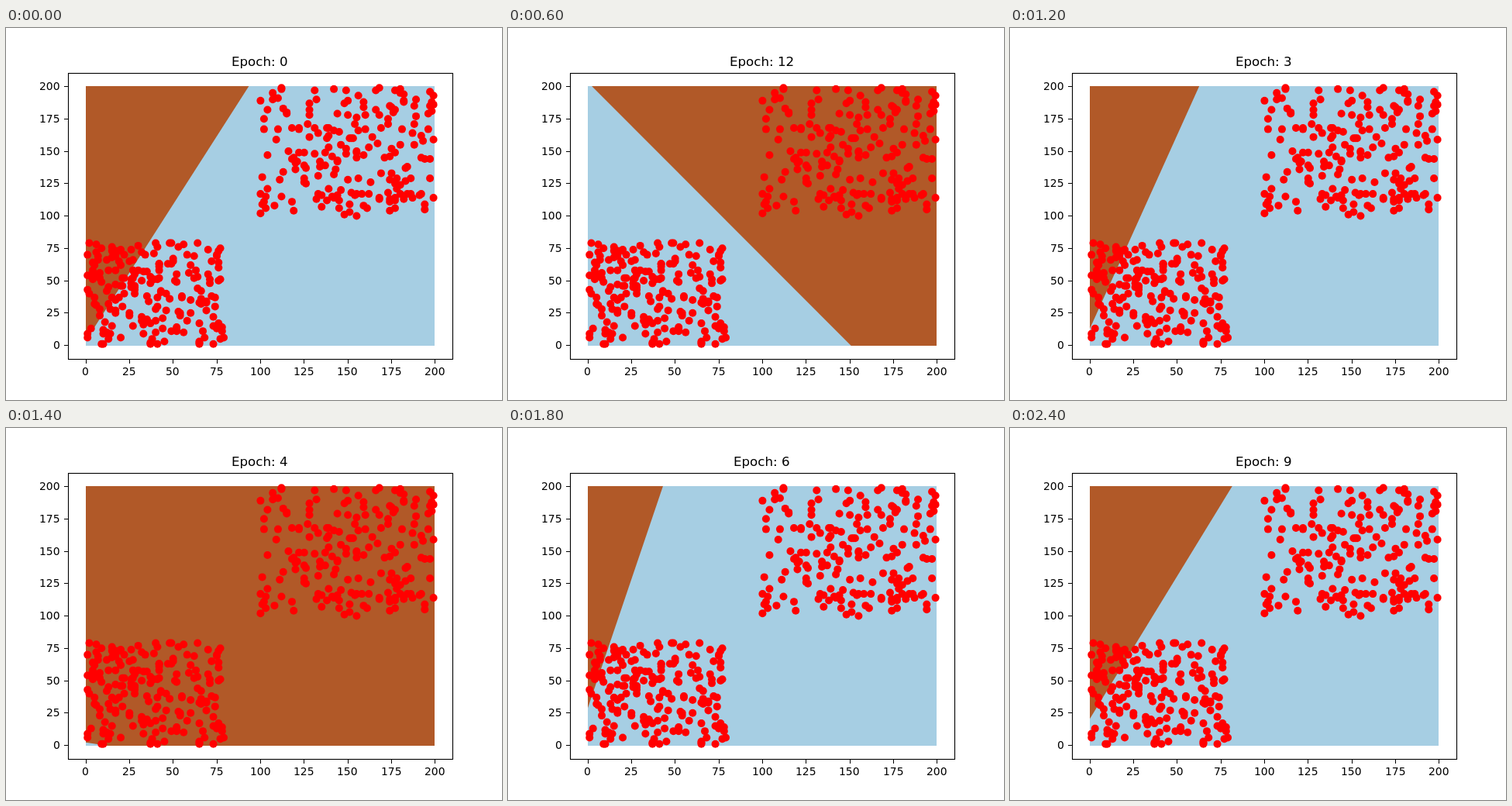
An HTML page with a canvas that plays this animation: 640x480 px, repeating every 2.6 s.

```html
<!DOCTYPE html>
<html lang="en">
<head>
<meta charset="utf-8">
<title>Epoch plot</title>
<style>
html, body { margin: 0; width: 100%; height: 100%; overflow: hidden; background: #fff; }
canvas { display: block; }
</style>
</head>
<body>
<canvas id="plot" width="640" height="480"></canvas>
<script>
const ctx = document.getElementById('plot').getContext('2d');
const STEP = 200, EPOCHS = 13;
const BLUE = '#a6cee3', BROWN = '#b15928', RED = '#f00';
const X = v => 102.55 + 2.2545 * v;
const Y = v => 409.1 - 1.67 * v;

// Decision line after each epoch: its x at y=0 and at y=200; the last one is final
const lines = [
  [-1.4, 93.5], [-2.6, 84], [-3.4, 73], [-4, 62.8], [10, -1000], [-6.2, 137],
  [-7, 43.2], [79.3, 67], [-7.8, 137], [-9, 81.7], [150.5, 2.5]
];

// Epochs play in the order of their file names: 0, 10, 11, 12, 1, 2, ...
const order = [...Array(EPOCHS).keys()].sort((a, b) => a + 'p' < b + 'p' ? -1 : 1);

let seed = 20240611;
function rand() {
  seed = (seed * 16807) % 2147483647;
  return seed / 2147483647;
}

function cluster(min, max, count) {
  const coord = () => min + Math.floor(rand() * (max - min + 1));
  return Array.from({ length: count }, () => [coord(), coord()]);
}

const points = [...cluster(1, 79, 200), ...cluster(100, 199, 200)];

// align: 0 left, 0.5 centre, 1 right; glyphs start on whole pixels
function label(text, x, y, size, align) {
  ctx.font = size + 'px "DejaVu Sans", sans-serif';
  ctx.fillText(text, Math.floor(x - ctx.measureText(text).width * align), y);
}

function drawRegion([bottom, top]) {
  const lean = (top - bottom) / 100;
  const far = X(bottom > top ? 3000 : -3000);
  const y0 = Y(-2), y1 = Y(202);
  ctx.save();
  ctx.beginPath();
  ctx.rect(103, 75, 450, 335);
  ctx.clip();
  ctx.fillStyle = BLUE;
  ctx.fillRect(103, 75, 450, 335);
  ctx.fillStyle = BROWN;
  ctx.beginPath();
  ctx.moveTo(X(bottom - lean), y0);
  ctx.lineTo(X(top + lean), y1);
  ctx.lineTo(far, y1);
  ctx.lineTo(far, y0);
  ctx.fill();
  ctx.restore();
}

function drawPoints() {
  ctx.fillStyle = RED;
  for (const [x, y] of points) {
    ctx.beginPath();
    ctx.arc(X(x) + 0.4, Y(y) + 0.4, 5, 0, Math.PI * 2);
    ctx.fill();
  }
}

function drawAxes() {
  ctx.fillStyle = ctx.strokeStyle = '#000';
  ctx.lineWidth = 1.11;
  ctx.strokeRect(80.5, 58.5, 496, 369);
  for (let v = 0; v <= 200; v += 25) {
    const x = Math.round(X(v)), y = Math.round(Y(v));
    ctx.fillRect(x, 428, 1, 5);
    ctx.fillRect(75, y, 5, 1);
    label(v, X(v) + 0.3, 448, 13.89, 0.5);
    label(v, 70.3, y + 5, 13.89, 1);
  }
}

function draw(epoch) {
  ctx.fillStyle = '#fff';
  ctx.fillRect(0, 0, 640, 480);
  drawRegion(lines[Math.min(epoch, lines.length - 1)]);
  drawPoints();
  drawAxes();
  label('Epoch: ' + epoch, 328, 49, 16.67, 0.5);
}

let shown = -1;
const start = performance.now();
function tick() {
  const t = Math.max(0, performance.now() - start);
  const epoch = order[Math.floor(t / STEP) % EPOCHS];
  if (epoch !== shown) draw(shown = epoch);
  requestAnimationFrame(tick);
}
tick();
</script>
</body>
</html>
```
